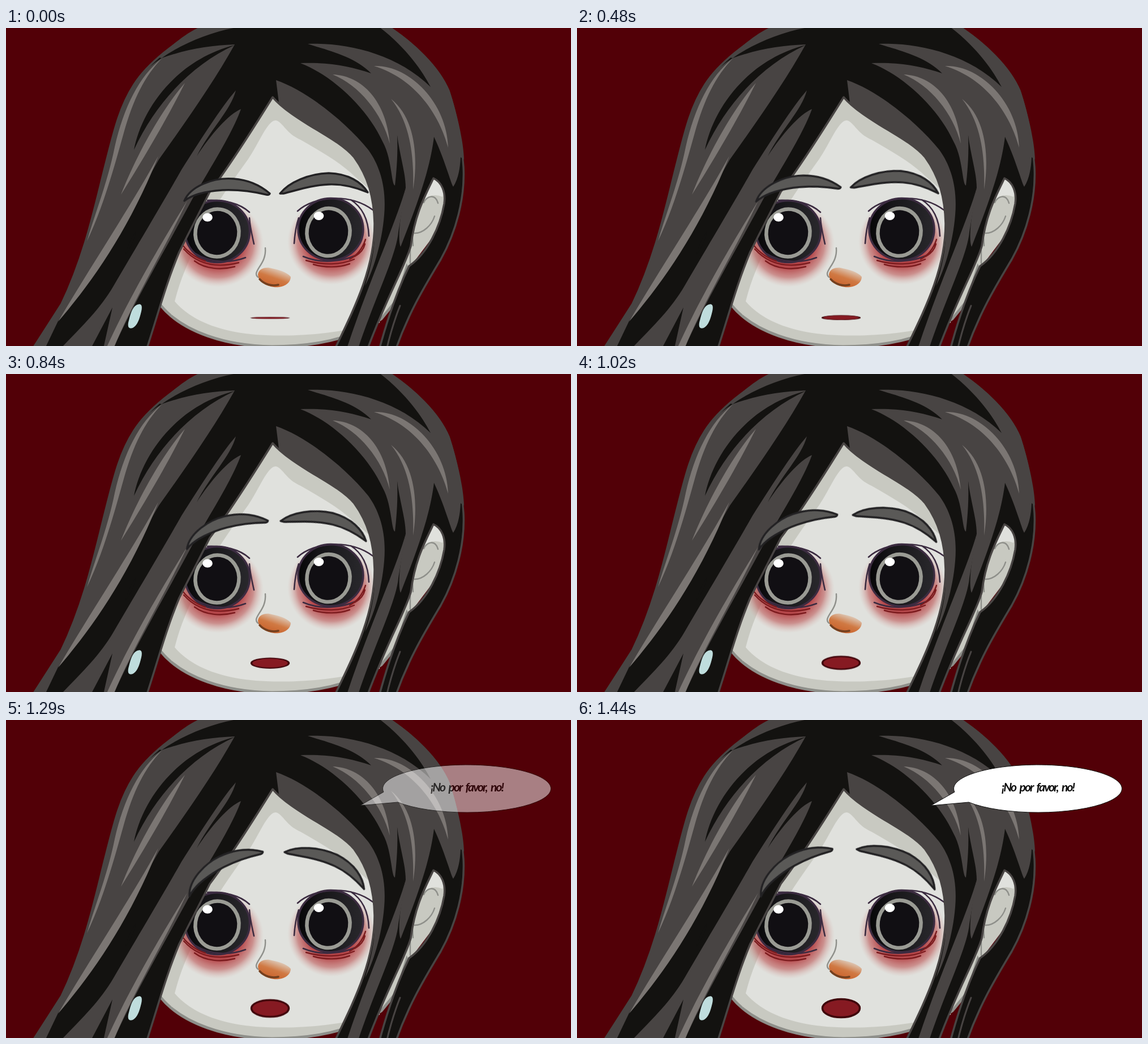
Recreate the animation shown at these times as an HTML page. Size 998x561 px, loop 3480 ms.

```html
<!DOCTYPE html>
<html lang="es">
<head>
<meta charset="utf-8">
<title>¡No por favor, no!</title>
<style>
html, body { margin: 0; width: 100%; height: 100%; overflow: hidden; background: #520007; }
svg { display: block; width: 998px; height: 561px; }
.black { fill: #131210; }
.grey { fill: #484443; }
.shine { fill: #7b7673; }
.line { fill: none; stroke-linecap: round; stroke-linejoin: round; }
.lash { stroke: #3b2b40; stroke-width: 2.6; }
.crease { stroke: #7c1b1e; stroke-width: 2.4; }
.contour { stroke: #8e8f8a; stroke-width: 2.4; }
.brow { fill: #5a5957; stroke: #222123; stroke-width: 3.4; stroke-linejoin: round; }

/* 30 ms ticks inside a 3480 ms loop */
.brow, .mouth, .bubble { animation: 3480ms linear infinite; }
.brow.l { transform-origin: 332.5px 288.7px; --turn: -28.8deg; animation-name: raise; }
.brow.r { transform-origin: 617.4px 280px; --turn: 28deg; animation-name: raise; }
.mouth { transform-origin: 466.5px 508.5px; animation-name: gape; }
.bubble { animation-name: appear; }
@keyframes raise {
  0% { transform: rotate(0deg); }
  8.6% { transform: rotate(0deg); animation-timing-function: steps(36, end); }
  39.63%, 100% { transform: rotate(var(--turn)); }
}
@keyframes gape {
  0% { transform: translateY(3px) scaleY(.1); }
  8.6% { transform: translateY(3px) scaleY(.1); animation-timing-function: steps(36, end); }
  39.63%, 100% { transform: translateY(0px) scaleY(1); }
}
@keyframes appear {
  0% { opacity: 0; }
  32.74% { opacity: 0; animation-timing-function: steps(10, end); }
  41.36%, 100% { opacity: 1; }
}
text { font: italic bold 21px Lato, "Open Sans", sans-serif; letter-spacing: -2px; word-spacing: 4px; fill: #0b0b0b; }
</style>
</head>
<body>
<svg viewBox="0 0 998 561">
  <defs>
    <radialGradient id="blush">
      <stop offset="0" stop-color="#ab2b30"/>
      <stop offset=".55" stop-color="#b0363a" stop-opacity=".9"/>
      <stop offset=".78" stop-color="#ba4c4c" stop-opacity=".55"/>
      <stop offset="1" stop-color="#d8a8a2" stop-opacity="0"/>
    </radialGradient>
    <linearGradient id="globe">
      <stop offset="0" stop-color="#060607"/>
      <stop offset=".3" stop-color="#151417"/>
      <stop offset="1" stop-color="#29282c"/>
    </linearGradient>
    <linearGradient id="tip" x1=".25" y1=".9" x2=".75" y2=".05">
      <stop offset="0" stop-color="#c9622c"/>
      <stop offset=".45" stop-color="#d07943"/>
      <stop offset="1" stop-color="#e0dad0"/>
    </linearGradient>
  </defs>
  <rect width="998" height="561" fill="#520007"/>

  <!-- face -->
  <path fill="#c8c9c1" stroke="#8e8f8a" stroke-width="5" d="M470 100L250 420L273 489C312 537 390 561 470 562C540 562 610 550 663 513L690 480L715 400L700 250Z"/>
  <path fill="#e0e1dd" d="M476 163C488 164 494 186 520 197C560 220 590 237 615 261L660 300V520Q560 546 460 542C380 539 310 515 282 458L310 400L376 306C392 281 410 256 428 231C447 203 462 163 476 163Z"/>
  <path fill="#c8c9c1" d="M300 390L275 458L293 507C299 470 311 437 328 400Z"/>

  <!-- ear -->
  <path fill="#c8c9c1" d="M752 255L782 285L768 350L712 424L700 400Z"/>
  <path fill="#e0e1dd" d="M752 258L776 282L771 298Q752 290 739 303Z"/>
  <path class="line contour" d="M738 308C743 297 758 291 763 309M757 332C752 348 737 362 722 362M717 352L719 384M714 392V415"/>

  <!-- eyes -->
  <ellipse cx="374" cy="380" rx="81" ry="77" fill="url(#blush)"/>
  <ellipse cx="575" cy="377" rx="78" ry="76" fill="url(#blush)"/>
  <g>
    <ellipse cx="373.500" cy="359" rx="57" ry="54.500" fill="url(#globe)" stroke="#3b2b40" stroke-width="3.500"/>
    <ellipse cx="373" cy="361.500" rx="38.500" ry="42" fill="#110f13" stroke="#9a9b94" stroke-width="6.500" transform="rotate(8 373 361)"/>
    <ellipse cx="356" cy="334" rx="8.800" ry="7.600" fill="#fff"/>
    <path class="line lash" d="M356 304C385 303 413 309 430 325M430 335C431 352 435 367 438 381M335 398C362 415 397 415 423 405"/>
    <path class="line crease" d="M312 383C325 400 340 407 352 411M314 390C340 419 375 423 411 414M333 411C353 426 381 427 404 421"/>
  </g>
  <g>
    <ellipse cx="573.500" cy="355" rx="57.500" ry="54.500" fill="url(#globe)" stroke="#3b2b40" stroke-width="3.500"/>
    <ellipse cx="569.500" cy="360" rx="38" ry="42" fill="#110f13" stroke="#9a9b94" stroke-width="6.500" transform="rotate(8 569 360)"/>
    <ellipse cx="552.500" cy="331.500" rx="8.800" ry="7.600" fill="#fff"/>
    <path class="line lash" d="M515 323C545 296 607 291 648 321M517 335C512 350 510 365 509 380M609 303C631 317 640 340 641 367M525 403C555 416 593 413 620 400"/>
    <path class="line crease" d="M530 410C560 419 592 418 615 408M543 417C563 423 588 423 607 416M607 408C622 400 630 388 635 373M616 403C627 397 632 390 634 381"/>
  </g>

  <!-- nose and mouth -->
  <path class="line contour" d="M458 388C460 412 444 422 442 433Q442 438 446 440"/>
  <path fill="url(#tip)" d="M445 435C446 426 455 422 465 423C480 426 496 430 503 439C503 448 494 456 482 457C465 459 446 449 445 435Z"/>
  <path class="line" stroke="#74401f" stroke-width="3.500" d="M448 443C456 452 469 456 481 453"/>
  <ellipse class="mouth" cx="466.500" cy="508.500" rx="33" ry="16" fill="#861a22" stroke="#3f040a" stroke-width="3.500"/>

  <!-- hair -->
  <path class="black" stroke="#484443" stroke-width="3.500" stroke-linejoin="round" d="M44 571L98 487C140 400 158 310 176 240C190 185 200 140 226 100C250 62 302 22 350 -3H672C720 25 765 70 782 111C795 150 805 200 808 245C811 300 795 360 768 408C740 455 712 500 688 568H659C672 520 690 465 712 420C745 397 767 350 774 310C777 290 770 272 755 265C738 300 722 330 715 385C705 420 670 480 638 568H580C615 495 651 425 651 345C650 300 640 262 615 228C585 192 505 162 471 122C430 188 395 243 360 289L306 395C283 450 270 500 248 568Z"/>
  <path class="grey" d="M46 565L98 487C140 400 158 310 176 240C190 185 200 140 226 100C240 78 257 65 275 53C320 37 360 31 404 29C370 90 325 155 270 232L205 345L140 450L92 517L69 565Z"/>
  <path class="grey" d="M275 53C310 28 360 8 402 0L402 -3H345C315 10 290 33 270 52Z"/>
  <path class="black" d="M226 215C238 150 295 58 404 30C330 64 265 130 226 215Z"/>
  <path class="grey" d="M406 110C380 140 345 195 310 250C270 320 225 395 190 455C165 498 130 530 97 565H150L188 493L172 565H190C225 485 285 385 330 300C365 240 400 185 415 143C393 152 361 189 337 226C360 180 397 145 406 110Z"/>
  <path class="black" d="M230 358Q217 375 211 400Q225 382 230 358Z"/>
  <g class="shine">
    <path d="M275 54C235 85 208 140 192 210C180 270 158 325 143 376C170 320 190 250 208 185C225 125 245 85 275 54Z"/>
    <path d="M316 97C278 140 232 220 203 294C240 235 282 165 316 97Z"/>
    <path d="M269 226C220 315 150 420 92 518C155 445 220 350 269 226Z"/>
    <path d="M320 305C280 370 220 470 177 565H190C225 480 280 390 320 305Z"/>
  </g>
  <path class="grey" d="M533 28C600 25 690 45 750 104C735 75 705 32 655 -5H675C725 28 768 72 784 112C797 152 808 200 809 232L803 228C802 250 798 268 790 280C786 275 776 235 756 192C750 240 735 290 697 386C690 370 700 310 706 282C706 250 690 210 689 163C694 210 690 250 687 278C680 275 682 230 665 200C640 145 580 85 520 62C570 60 610 68 645 80C615 50 570 40 533 28Z"/>
  <path class="grey" d="M477 92C530 110 600 165 640 215C662 245 672 285 668 330C664 380 648 430 634 455C652 400 652 370 651 345C650 300 640 262 615 228C590 198 515 170 482 132Z"/>
  <path class="grey" d="M706 282C690 340 640 450 602 565H622C650 480 690 400 693 360Z"/>
  <path class="line" stroke="#484443" stroke-width="3" d="M696 490Q682 525 672 568"/>
  <g class="shine">
    <path d="M650 67C710 64 779 130 781 211C766 155 725 90 650 67Z"/>
    <path d="M577 82C630 84 672 130 678 204C664 150 624 101 577 82Z"/>
    <path d="M680 125C724 160 728 230 719 285C721 230 715 168 680 125Z"/>
  </g>
  <path fill="#bfdddd" d="M232 488C240 485 241 491 239 500C236 513 232 525 224 529C216 532 214 526 217 516C220 503 224 491 232 488Z"/>

  <path class="brow l" d="M315 305C325 280 365 263 402 266C430 268 452 280 466 292Q465 295 460 294C435 288 405 285 382 286C352 288 330 293 315 305Z"/>
  <path class="brow r" d="M484 292C500 272 535 257 570 256C605 257 628 272 639 290C620 282 595 275 570 276C540 277 515 286 490 292Z"/>

  <g class="bubble">
    <path fill="#fff" stroke="#111" d="M667 127L625 151L692 145A148.500 42 0 1 0 667 127Z"/>
    <text x="814" y="125.500" text-anchor="middle">¡No por favor, no!</text>
  </g>
</svg>
</body>
</html>
```
